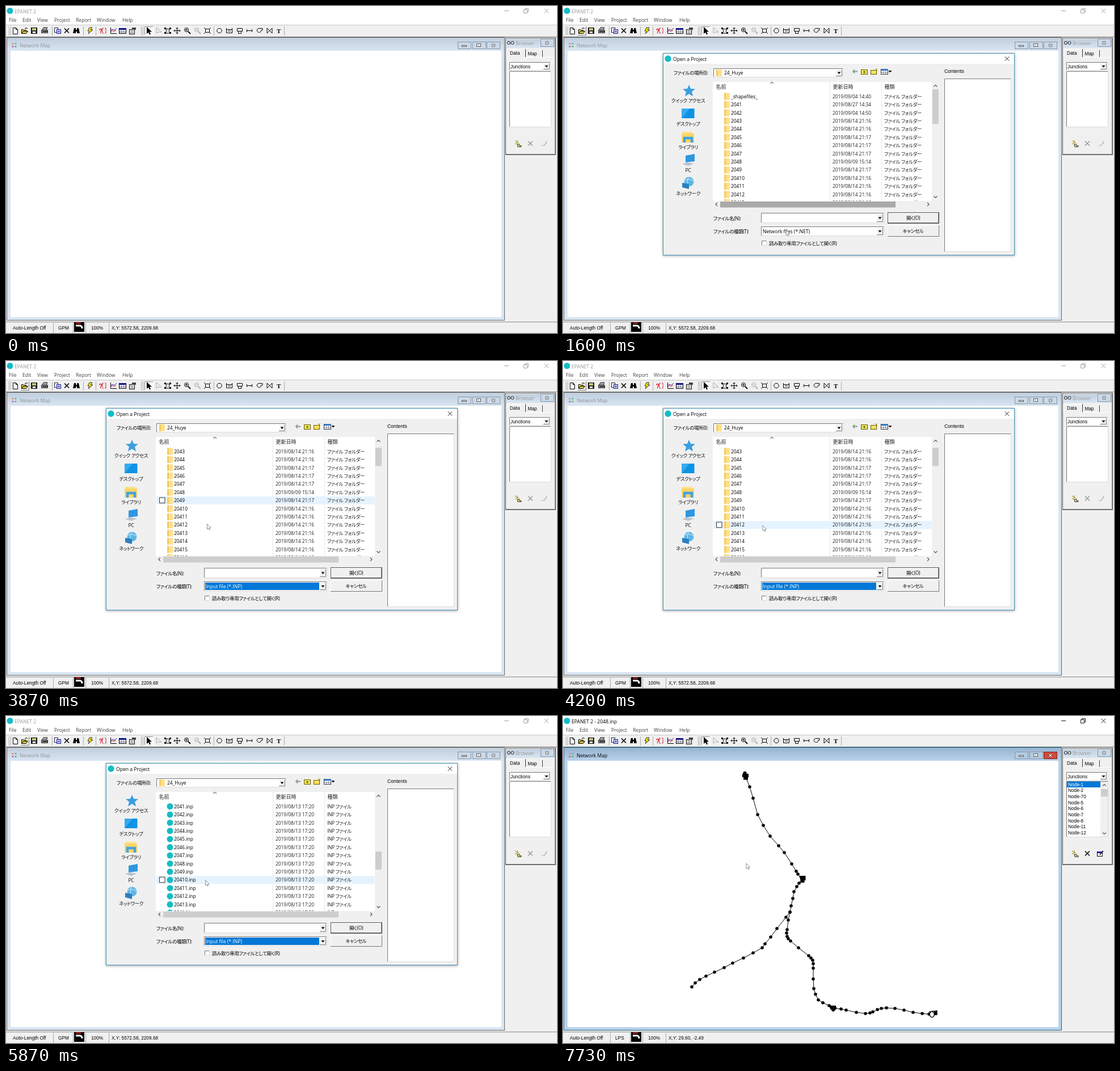
Animation of 971 by 577 pixels, one loop 8 s. Source, as an HTML page:

```html
<!DOCTYPE html>
<html lang="ja">
<head>
<meta charset="utf-8">
<title>Open a project</title>
<style>
html, body { margin: 0; width: 100%; height: 100%; overflow: hidden; background: #f0f0f0 }
svg { display: block; position: absolute; left: 0; top: 0 }
text { font: 8.6px "Open Sans", "Noto Sans CJK JP", sans-serif; white-space: pre }
.ms { font: 8.3px "Liberation Sans", Arial, sans-serif }
.label { font: 8.7px "Liberation Sans", Arial, sans-serif }
.query { font: bold 11px "Liberation Sans", Arial, sans-serif }
.serif { font: bold 11px "Liberation Serif", serif }
.jp { font-size: 8.5px; letter-spacing: -.35px; font-feature-settings: "palt" }
.row { font-size: 8.4px }
.head { font-size: 9px }
.mono { font: bold 6.3px "Liberation Mono", monospace }
.shadow { filter: drop-shadow(0 1px 2.5px rgba(0, 0, 0, .35)) }
</style>
</head>
<body>
<svg id="stage" width="971" height="577" viewBox="0 0 971 577">
<defs>
<linearGradient id="idle" x2="0" y2="1"><stop stop-color="#c0cedd"/><stop offset="1" stop-color="#d9e5f2"/></linearGradient>
<linearGradient id="busy" x2="0" y2="1"><stop stop-color="#98b3d0"/><stop offset="1" stop-color="#bad2eb"/></linearGradient>
<clipPath id="rowsClip"><rect x="264" y="152" width="386" height="192"/></clipPath>
<clipPath id="textClip"><rect x="673" y="129" width="116" height="304"/></clipPath>
</defs>
</svg>
<script>
const BLUE = '#0078d7', CYAN = '#14bcc6', FACE = '#f0f0f0';
const rect = (x, y, w, h, fill, line = 'none') =>
  `<rect x="${x}" y="${y}" width="${w}" height="${h}" fill="${fill}" stroke="${line}"/>`;
const path = (d, line = '#000', w = 1, fill = 'none') =>
  `<path d="${d}" stroke="${line}" stroke-width="${w}" fill="${fill}"/>`;
const shape = (d, fill) => path(d, 'none', 0, fill);
const disc = (x, y, r, fill, line = 'none') =>
  `<circle cx="${x}" cy="${y}" r="${r}" fill="${fill}" stroke="${line}"/>`;
const text = (x, y, s, cls = '', fill = '#000', anchor = 'start') =>
  `<text x="${x}" y="${y}" class="${cls}" fill="${fill}" text-anchor="${anchor}">${s}</text>`;
const group = (s, attr) => `<g ${attr}>${s}</g>`;
const cross = (x, y, r, line, w = 1) =>
  path(`M${x - r} ${y - r}l${2 * r} ${2 * r}m0 ${-2 * r}l${-2 * r} ${2 * r}`, line, w);
const bevel = (x, y, w, h, fill, a, b) => rect(x, y, w, h, fill) +
  path(`M${x + .5} ${y + h}V${y + .5}H${x + w}`, a) + path(`M${x} ${y + h - .5}H${x + w - .5}V${y}`, b);
const sunken = (x, y, w, h, fill = '#fff') => bevel(x, y, w, h, fill, '#777', '#dcdcdc');
const raised = (x, y, w, h) => bevel(x, y, w, h, FACE, '#fff', '#777');
const arrowDown = (x, y) => shape(`M${x - 3} ${y - 1.5}h6l-3 3.5z`, '#000');
const combo = (x, y, w, h) => sunken(x, y, w, h) + raised(x + w - 13, y + 2, 11, h - 4) + arrowDown(x + w - 7.5, y + h / 2);
const folder = (x, y) => rect(x, y - 6, 10, 12, '#ffe08a') + rect(x, y - 6, 3, 12, '#f3cc60');
const chevron = (x, y, dx, dy, c = '#555') => path(dx
  ? `M${x - dx} ${y - 3}l${2 * dx} 3l${-2 * dx} 3` : `M${x - 3} ${y - dy}l3 ${2 * dy}l3 ${-2 * dy}`, c, 1.2);

function toolbar(hot) {
  let s = rect(0, 33, 971, 22, FACE) + path('M0 33.5H971', '#c8c8c8') + path('M0 54.5H971', '#777');
  for (const x of [5.5, 8.5, 81.5, 136.5, 158.5, 238.5, 241.5, 366.5, 490.5]) s += path(`M${x} 36v16`, '#aaa');
  if (hot) s += raised(26, 36, 15, 16);
  s += bevel(244, 36, 16, 16, '#f8f8f8', '#888', '#fff');
  s += path('M12.5 38.5h5l3 3v8h-8zM17.5 38.5v3h3', '#000', 1, '#fff');
  s += path('M27.5 48.5v-7h3l1 1h4v2M27.5 48.5l3-4h8l-3 4zM33 40q3-3 5 0', '#000', 1, '#d8c440');
  s += rect(44.5, 38.5, 10, 10, '#333', '#000') + rect(46, 39, 7, 4, '#c8c87a') + rect(47, 45, 5, 3, '#fff');
  s += path('M64 42l2-4h7l-2 4M62.5 42.5h11v5h-11z', '#222', 1, '#aaa') + rect(64, 44, 9, 2, '#222');
  s += rect(85.5, 38.5, 6, 8, '#fff', '#224') + rect(89.5, 41.5, 7, 7, '#eef', '#118') + path('M91 44h4m-4 2h4', '#118');
  s += cross(107, 43.5, 4, '#000', 1.6);
  s += shape('M118 48l2-9h3v3h2v-3h3l2 9h-5v-3h-2v3z', '#000');
  s += path('M147 38h5l-3 4h4l-8 7l2-5h-3z', '#333', 1, '#ffe600');
  s += text(163.5, 47.5, '?', 'query', '#d00') + path('M172 39h-2v3l-1 2l1 1v3h2M174 39h2v9h-2', '#d0224a');
  s += path('M184.5 38v10.5H195') + path('M185 45l3-4l3 2l4-4', '#22c') + path('M185 41l4 4l5-2', '#d22');
  s += rect(199.5, 39.5, 12, 9, '#fff', '#000') + rect(200, 39, 12, 3, '#118') + path('M200 44.5h11m-11 2h11M203.5 42v7m4-7v7', '#668', .7);
  s += rect(217.5, 41.5, 9, 8, '#fff', '#000') + rect(222, 38, 7, 4, '#444') + path('M219 44h6m-6 3h6', '#333');
  s += shape('M248 37v12l3-2.5l2 4l2-1l-2-4h4z', '#000') + path('M265 38v10l3-2h6z', '#aaa');
  s += path('M281 40l8 1l-2 3l2 4h-8l2-4z');
  for (const x of [279, 288]) s += rect(x, 38, 3, 3, '#000') + rect(x, 46, 3, 3, '#000');
  s += path('M301.5 38v11M296 43.5h11M299.5 40l2-2l2 2M299.5 47l2 2l2-2M298 41.5l-2 2l2 2M305 41.5l2 2l-2 2');
  for (const [x, c, sign] of [[318, '#000', 'm-2-2v4'], [336, '#aaa', '']])
    s += disc(x, 42, 3.5, 'none', c) + path(`M${x + 3} 45l4 4`, c, 1.8) + path(`M${x - 2} 42h4${sign}`, c);
  s += rect(351.5, 40.5, 7, 6, 'none', '#000') + path('M349 38l3 3m9-3l-3 3m-9 8l3-3m9 3l-3-3');
  s += disc(376, 43.5, 4.2, 'none', '#000') + path('M388.5 39v8.5h10V39M389 41.5h10M391 44h5');
  s += path('M407.5 39.5h9v5h-9zM409.5 44.5v4h5v-4M424 43.5h10M424.5 41v5M433.5 41v5');
  s += path('M452 39.5h-6a4 3.5 0 1 0 3 6l1-3h2zM460 39v9l9-9v9z');
  return s + text(477, 47.5, 'T', 'serif');
}

function browser(loaded) {
  const ink = loaded ? '#000' : '#999';
  let s = rect(880.5, 56.5, 88, 206, FACE, '#555') + path('M881 261.5H967.5V57', '#8a8a8a') +
    rect(882, 58, 85, 16, 'url(#idle)') + disc(886, 65, 2.6, 'none', '#222') + disc(892.5, 65, 2.6, 'none', '#222') +
    text(898, 69, 'Browser', '', '#999') + rect(942.5, 58.5, 23, 13, '#cbd9e8', '#8797a8') +
    cross(953.5, 65, 2.5, '#555', 2.8) + cross(953.5, 65, 2.3, '#fff', 1.2) +
    path('M881.5 90V76.5H914M946.5 78v12M916 90.5H966', '#fff') + path('M915.5 76v14M945.5 78v12', '#333') +
    text(888, 85.5, 'Data', 'ms') + text(919.5, 87, 'Map', 'ms') + combo(887, 99, 73, 15) + text(889, 109.5, 'Junctions', 'ms') +
    sunken(887, 115, 74, 99);
  s += path('M897 238l8 5M901 237v6M897 243h4', '#998b00') + path('M901 244.5h4v2h3v2h-6z', '#333', 1, '#e8e060') + cross(924, 242.5, 4, ink, 1.5);
  if (!loaded) return s + path('M944 246h5l4-8M948 246l5-5', '#aaa');
  s += rect(941.5, 239.5, 9, 8, '#fff', '#000') + rect(942, 239, 9, 3, '#22a') + path('M946 245l6-7', '#000', 1.5);
  s += rect(888, 115.5, 59, 10.5, BLUE) + rect(947, 116, 13, 97, FACE) + rect(948, 129, 12, 13, '#cdcdcd') +
    chevron(954, 122, 0, -1.2) + chevron(954, 207, 0, 1.2);
  [1, 2, 70, 5, 6, 7, 8, 11, 12].forEach((n, i) => s += text(890, 123.7 + i * 10.65, 'Node-' + n, 'ms', i ? '#000' : '#fff'));
  return s;
}

const MAIN = [321,105, 329,125, 335,145, 343,174, 353,193, 365,212, 380,229, 390,241, 403,261, 411,274, 414,279, 421,288,
  416,295, 412,301, 407,310, 405,322, 402,335, 400,346, 397,360, 395,377, 394,383, 395,389, 397,393, 401,397, 415,409,
  433,423, 437,427, 440,431, 441,437, 441,445, 441,464, 442,481, 445,491, 450,501, 458,506, 469,511, 476,516, 490,517,
  499,519, 517,523, 533,525, 541,524, 546,522, 554,518, 561,516, 570,515, 585,516, 601,519, 617,523, 633,525, 645,526];
const SIDE = [400,346, 393,355, 377,375, 366,390, 356,402, 351,409, 335,418, 318,427, 299,436, 284,444, 267,452, 252,459, 241,465, 233,471, 227,478];

function network() {
  let s = '';
  for (const pts of [MAIN, SIDE]) {
    s += path('M' + pts.join(' '));
    for (let i = 0; i < pts.length; i += 2) s += disc(pts[i], pts[i + 1], 2.8, '#000');
  }
  return s + disc(320.5, 101, 3.2, '#000') + rect(316, 102, 11, 6, '#000') + rect(318, 106, 8, 6.5, '#000') +
    shape('M416 282h11.5v8h-2v4h-7v-5z', '#000') + shape('M469 511h12v3h2l-3 5l-4 3l-5-5z', '#000') +
    path('M646 523l4-2l4 3v5l-3 3l-4-2zM646 521l3 3', '#000', 1.3, '#fff') + path('M650 521h5l4-1v7h-5', '#000', 1.3) + rect(654, 521, 5, 6, '#000');
}

function mainWindow(active, loaded, hot) {
  const ink = active ? '#000' : '#999', glaze = active ? 'url(#busy)' : 'url(#idle)';
  const edge = active ? '#bad2eb' : '#d9e5f2', btn = active ? '#b4cbe3' : '#cbd9e8';
  let s = rect(0, 0, 971, 577, FACE) + rect(0, 0, 971, 33, '#fff') + disc(7, 8.5, 5.5, CYAN) +
    text(15, 12.5, 'EPANET 2' + (loaded ? ' - 2048.inp' : ''), '', ink) +
    path('M878 8.5h8M912.5 6.5h6v6h-6zM914.5 6v-1.5h6v6h-2', ink, .9) + cross(952.5, 8.5, 3.7, ink, .9);
  [[5, 'File'], [29, 'Edit'], [55, 'View'], [85, 'Project'], [123, 'Report'], [160, 'Window'], [205, 'Help']]
    .forEach(([x, m]) => s += text(x, 28, m, '', '#444'));
  s += toolbar(hot) + rect(1.5, 55.5, 877, 499, edge, active ? '#1c6c84' : '#666') + rect(2, 56, 876, 23, glaze) +
    rect(8, 79, 865, 470, '#fff');
  [[12, 66.5, '#e85'], [17, 66.5, '#4bc'], [12, 71.5, '#c5c'], [17, 71.5, '#6b4']].forEach(([x, y, c]) => s += disc(x, y, 1.6, c));
  s += text(24, 73, 'Network Map', '', active ? '#000' : '#8e959d');
  for (const x of [796.5, 822.5, 847.5]) {
    const red = active && x > 840;
    s += rect(x, 63.5, 23, 12, red ? '#d2493d' : btn, red ? '#7a2a24' : '#8595a6');
  }
  s += rect(803.5, 69.5, 8, 2, '#fff', '#555') + rect(829.5, 66.5, 7, 5, '#fff', '#555') + rect(832, 68.5, 2, 1, '#555') +
    cross(859, 69.5, 2.5, '#555', 2.8) + cross(859, 69.5, 2.3, '#fff', 1.2);
  if (loaded) s += network();
  s += rect(0, 557, 971, 20, FACE) + path('M0 557.5H971', '#888');
  for (const x of [83.5, 118.5, 140.5, 181.5]) s += path(`M${x} 559v18`, '#aaa');
  s += text(12, 570.5, 'Auto-Length Off', 'ms') + text(92, 570.5, loaded ? 'LPS' : 'GPM', 'ms') +
    rect(120, 558, 18, 17, '#000') + path('M123 564h7q4 0 4 5', '#fff', 3) + path('M123 559.5h9', '#d22', 2) +
    text(150, 570.5, '100%', 'ms') + text(186, 570.5, 'X,Y: ' + (loaded ? '29.60, -2.49' : '5572.58, 2209.68'), 'ms');
  return s + browser(loaded);
}

// Folder and file list
const DATES = ['09/04 14:40', '08/27 14:34', '09/04 14:50', , , '08/14 21:17', '08/14 21:17', '08/14 21:17', '09/09 15:14', '08/14 21:17'];
const PITCH = 14.42, TOP = 152.3;
const rowAt = y => Math.floor((y - TOP) / PITCH);

function rows(first, hover, picked, lateIcons) {
  let s = '';
  for (let r = 0; r < 14; r++) {
    const i = first + r, y = 159.5 + r * PITCH, isFile = i > 38;
    const name = isFile ? `204${i - 38}.inp` : i ? '204' + i : '_shapefiles_';
    if (r === hover) {
      s += rect(265, y - 7, 384.5, 14, picked ? '#cce8ff' : '#e5f3ff', picked ? '#a5d5fa' : 'none') + rect(270.5, y - 5, 9.5, 9.5, '#fff', '#333');
      if (picked) s += path(`M272 ${y}l2.5 2.5l4-5`, '#222', 1.2);
    }
    if (!isFile) s += folder(284, y);
    else if (first < 39 || (lateIcons && r < 2)) s += path(`M284.5 ${y - 5.5}h6l3 3v8.5h-9z`, '#999', 1, '#fff');
    else s += disc(289, y, 5.5, CYAN);
    s += text(296, y + 3.2, name, 'row') +
      text(475, y + 3.2, '2019/' + (isFile ? '08/13 17:20' : DATES[i] || '08/14 21:16'), 'row', '#222') +
      text(566, y + 3.2, isFile ? 'INP ファイル' : 'ファイル フォルダー', 'jp', '#222');
  }
  return group(s, 'clip-path="url(#rowsClip)"');
}

const range = (a, b) => Array.from({ length: b - a + 1 }, (_, i) => a + i);
const NODES = [1, 2, 70, ...range(5, 8), ...range(11, 13), ...range(15, 28), ...range(30, 35), ...range(37, 51)];
const ELEV = '09 10 10 96 97 93 96 87 87 87 87 87 88 87 82 79 79 83 86 88 92 93 95 97 98 97 91 92 86 81 88 92 95 96 98 00 94 96 96 96 93 92 95 02 09'.split(' ');

function contents() {
  const line = (n, x, s) => text(x, 134.3 + n * 6.09, s, 'mono');
  let s = line(0, 674, '[TITLE]') + line(1, 674, '2048 WSS in Huye District') + line(3, 674, '[JUNCTIONS]') +
    line(4, 674, ';ID') + line(4, 765, 'Elev');
  NODES.forEach((n, i) => s += line(5 + i, 678, 'Node-' + n) + line(5 + i, 765, (ELEV[i] < 50 ? '18' : '17') + ELEV[i] + '.0'));
  return group(s, 'clip-path="url(#textClip)"');
}

function places(hover) {
  let s = hover ? bevel(183, 175, 78, 42, '#f4f4f4', '#fff', '#bbb') : '';
  s += shape('M222 139l3 7l8 .5l-6 5l2 8l-7-4.500l-7 4.500l2-8l-6-5l8-.5z', '#3b9ee0') +
    rect(209, 181, 22.5, 17, '#0f93e4') + shape('M209 198V181h14z', '#35abf0') +
    rect(210, 222, 18, 15, '#ffe08a') + rect(209, 225, 22, 16, '#fbd566') + path('M214 241v-8h13v8', '#41a4df', 4.5) +
    shape('M216 264l16-3v13l-16 2z', '#2f97e0') + shape('M210 279l8-3l13 2l-10 4z', '#b9c3cc') +
    disc(222, 310, 8.5, '#5db5e6') + path('M214 308q8-5 16 1M221 302q-4 8 1 16', '#bfe3f5', 1.2) + shape('M210 312l12 2v9l-12-3z', '#2b7fc0');
  ['クイック アクセス', 'デスクトップ', 'ライブラリ', 'PC', 'ネットワーク']
    .forEach((n, i) => s += text(220.5, 170.3 + i * 40.8, n, 'jp', '#111', 'middle'));
  return s;
}

function dialog(o) {
  let s = group(rect(176.5, 83.5, 619, 356, FACE, '#3d8fb8'), 'class="shadow"') + rect(177, 84, 618, 18, '#fff') +
    disc(185, 93, 5.7, CYAN) + text(194, 96.5, 'Open a Project') + cross(782.5, 93, 3.7, '#222') +
    text(195, 121.3, 'ファイルの場所(I):', 'jp') + combo(265, 110, 229, 16) + folder(270, 118) + text(284, 121.3, '24_Huye', 'row') +
    path('M519 115.5h-8m3-3l-3 3l3 3', '#8aa08a', 1.8) +
    rect(525.5, 112.5, 11, 8, '#f7e05a', '#665c00') + path('M531 119v-4m-2 2l2-2l2 2', '#050') +
    rect(542.5, 113.5, 10, 7, '#f7e05a', '#665c00') + path('M550 110l4 4m0-4l-4 4', '#b09a00') +
    rect(560.5, 111.5, 12, 9, '#fff', '#333') + rect(561, 111, 12, 3, '#3579c8') + path('M564.5 114v7m4-7v7M561 117.5h11', '#668', .7) + arrowDown(576.5, 115.5) +
    text(672, 118, 'Contents', 'label') + sunken(672, 128, 118, 306) + places(o.place);
  s += rect(264, 134, 399, 222, '#fff') + path('M470.5 134v210M561.5 134v210', '#e5e5e5') + chevron(368, 135.5, 0, -1.2, '#777') +
    text(269.5, 146, '名前', 'head', '#222') + text(475.5, 146, '更新日時', 'head', '#222') + text(566.5, 146, '種類', 'head', '#222');
  if (o.filled) s += rows(o.first, o.hover, o.picked, o.lateIcons);
  s += rect(650, 134, 13, 210, FACE) + rect(264, 344, 399, 12, FACE) +
    rect(651, o.inp ? 146 + o.first * 2.39 : 147, 11, o.inp ? 32 : 61, '#cdcdcd') +
    rect(277, 345, 309, 10.5, o.barHot ? '#a9a9a9' : '#cdcdcd') +
    chevron(656.5, 141, 0, -1.5) + chevron(656.5, 337, 0, 1.5) + chevron(270.5, 350, -1.5, 0) + chevron(643.5, 350, 1.5, 0);
  s += text(265, 377.5, 'ファイル名(N):', 'jp') + combo(349, 365, 217, 18) + text(265, 401, 'ファイルの種類(T):', 'jp') + combo(349, 389, 217, 17);
  if (o.caret) s += path('M352.5 368v12');
  if (o.picked) s += text(351.5, 377, '2048.inp', 'row') + contents();
  if (o.focus) s += rect(351, 391, 201, 13, BLUE);
  s += text(352, 401, o.inp ? 'Input file (*.INP)' : 'Network files (*.NET)', '', o.focus ? '#fff' : '#000');
  s += rect(572, 364, 91, 20, '#555') + raised(573, 365, 89, 18) + text(617, 377, '開く(O)', 'jp', '#000', 'middle') +
    raised(572, 387, 91, 20) + text(617, 400, 'キャンセル', 'jp', '#000', 'middle') +
    sunken(350, 414, 9, 9) + text(363, 421.5, '読み取り専用ファイルとして開く(R)', 'jp');
  if (o.drop > 0) {
    s += rect(349.5, 405.5, 216, o.drop, '#fff', '#333');
    ['Network files (*.NET)', 'Input file (*.INP)', 'All files (*.*)'].forEach((n, i) => {
      if (i * 16 + 14 > o.drop) return;
      const on = i === o.item;
      s += (on ? rect(350, 406 + i * 16, 215, 16, BLUE) : '') + text(352, 417 + i * 16, n, '', on ? '#fff' : '#000');
    });
  }
  return s;
}

// Keys: time, x, y
const TRAIL = [[0, 32, 41], [467, 32, 41], [800, 211, 222], [1300, 372, 342], [1600, 393, 395], [2133, 396, 404], [2400, 396, 404], [2867, 398, 426],
  [3330, 398, 426], [3800, 355, 287], [4200, 352, 290], [5860, 352, 290], [6330, 323, 260], [8001, 323, 260]];
const SCROLL = [[3780, 3], [4520, 9], [4590, 15], [4660, 21], [4730, 24], [4860, 27], [4990, 33], [5060, 36], [5130, 39]];

function pointer(t) {
  const i = TRAIL.findIndex(k => k[0] > t), [t0, x0, y0] = TRAIL[i - 1], [t1, x1, y1] = TRAIL[i];
  const p = (t - t0) / (t1 - t0);
  return [x0 + (x1 - x0) * p, y0 + (y1 - y0) * p];
}

const stage = document.getElementById('stage');
const layers = [0, 1, 2].map(() => stage.appendChild(document.createElementNS('http://www.w3.org/2000/svg', 'g')));
const cache = [];
const show = (i, s) => { if (cache[i] !== s) layers[i].innerHTML = cache[i] = s; };

function draw(t) {
  const active = (t > 60 && t < 300) || t > 7590, loaded = t > 7720;
  show(0, mainWindow(active, loaded, t > 60 && t < 7590));

  const [x, y] = pointer(t);
  const p = t < 5000 ? Math.min(1, (t - 720) / 160) : t < 7520 ? 1 : t < 7590 ? .5 : 0;
  if (p > 0) {
    const first = SCROLL.reduce((n, [at, v]) => t >= at ? v : n, 0);
    const moving = t > 3780 && t < 4190;
    const hover = t < 3560 ? -1 : moving ? 9 - first : rowAt(y);
    const q = Math.min(1, Math.max(0, (t - 1930) / 270));
    const s = dialog({
      first, hover, filled: t > 980, picked: t > 6320, lateIcons: t < 5260, place: t < 860, caret: t < 1300,
      barHot: t > 1300 && t < 1650, inp: t > 3390, focus: t > 1990 && t < 6320,
      drop: t < 3320 ? 49 * (1 - (1 - q) ** 2) : 0, item: y > 418 ? 1 : 0
    });
    const zoom = `translate(486 261.5) scale(${.952 + .048 * p}) translate(${-486 - (1 - p) * 5} -261.5)`;
    show(1, p < 1 ? group(s, `opacity="${p * 1.08}" transform="${zoom}"`) : s);
  } else show(1, '');

  show(2, t < 60 ? '' : group(path('M0 0V9.5L2.2 7.5L3.7 10.6L5 10L3.7 7H6.5Z', '#777', .8, '#fff'), `transform="translate(${x} ${y})"`));
}

// The screen refreshes 15 times a second
function tick() {
  const step = Math.floor(performance.now() % 8000 * .015 + .08);
  draw(Math.min(7999, step * 1000 / 15));
  requestAnimationFrame(tick);
}
tick();
</script>
</body>
</html>
```
